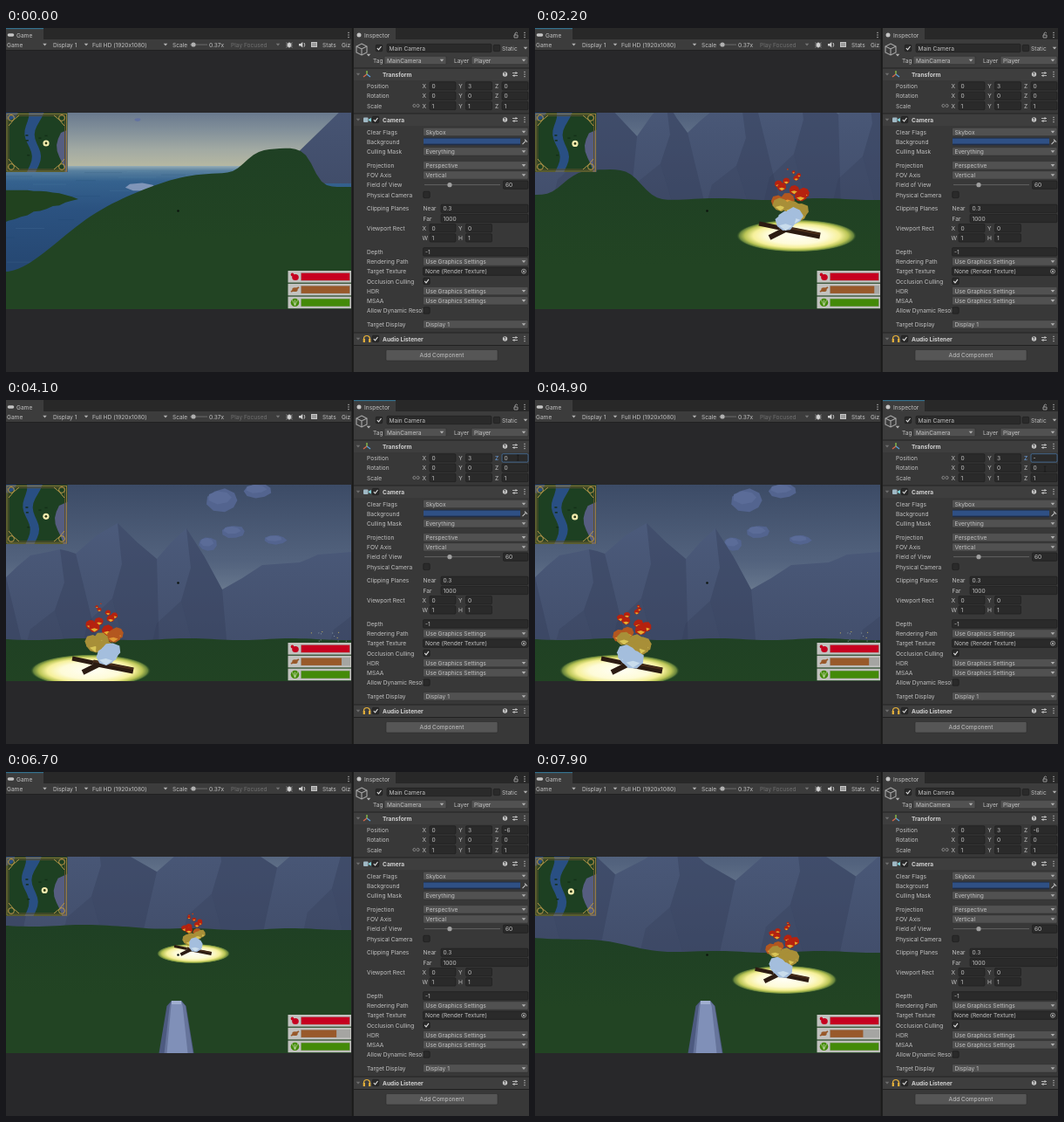
Write an HTML page with a canvas that moves like this. It is 600x394 px and loops after 8000 ms.

```html
<!DOCTYPE html>
<html lang="en">
<head>
<meta charset="utf-8">
<title>Camera inspector</title>
<style>
html, body { margin: 0; width: 100%; height: 100%; overflow: hidden; background: #28282a; }
canvas, svg { position: absolute; left: 0; top: 0; }
canvas { top: 97px; }
text { font: 6.6px Inter, Roboto, sans-serif; fill: #c2c2c2; }
.b { font-weight: 700; fill: #d2d2d2; }
.dim { fill: #707070; }
</style>
</head>
<body>
<canvas id="view" width="396" height="225"></canvas>
<svg id="ui" width="600" height="394" viewBox="0 0 600 394"></svg>
<script>
const ui = document.getElementById('ui');
const g = document.getElementById('view').getContext('2d');
const TAU = Math.PI * 2;

// ---------- editor panels ----------
function el(tag, attrs, text) {
  const e = document.createElementNS('http://www.w3.org/2000/svg', tag);
  for (const k in attrs) e.setAttribute(k, attrs[k]);
  if (text !== undefined) e.textContent = text;
  return ui.appendChild(e);
}
const box = (x, y, width, height, fill, more) => el('rect', { x, y, width, height, fill, ...more });
const dot = (cx, cy, r, fill = '#c4c4c4', more) => el('circle', { cx, cy, r, fill, ...more });
const label = (x, y, s, cls = '') => el('text', { x, y: y + 2.6, class: cls }, s);
const path = (d, stroke = '#c4c4c4', fill = 'none', w = 0.9) => el('path', { d, stroke, fill, 'stroke-width': w });
const arrow = (x, y, c = '#b0b0b0') => path(`M${x - 2.3} ${y - 1.2}h4.6l-2.3 2.8z`, 'none', c);
const edge = c => ({ rx: 1.3, stroke: c, 'stroke-width': 0.6 });
const field = (x, y, w, s) => [box(x, y - 4.7, w, 9.4, '#2a2a2a', edge('#1d1d1d')), label(x + 2.5, y, s)];
const drop = (x, y, w, s) => {
  box(x, y - 4.7, w, 9.4, '#515151', edge('#303030'));
  label(x + 3, y, s);
  arrow(x + w - 5, y);
};
const check = (x, y, on) => {
  box(x - 3.7, y - 3.7, 7.4, 7.4, '#2a2a2a', edge('#1a1a1a'));
  if (on) path(`M${x - 2.2} ${y}l1.7 1.9 3-3.9`, '#e0e0e0', 'none', 1.1);
};
const menu = (x, y) => [-2.6, 0, 2.6].forEach(d => box(x - 0.6, y + d - 0.6, 1.2, 1.2, '#c4c4c4'));
function header(y, name, on) {
  box(399, y - 7, 201, 14, '#3e3e3e');
  box(399, y - 7.4, 201, 0.8, '#1c1c1c');
  arrow(404, y, '#6e6e6e');
  if (on) check(424, y, true);
  label(432, y, name, 'b');
  dot(572.5, y, 2.7);
  el('text', { x: 571.1, y: y + 1.8, style: 'font-size:4.5px;font-weight:700;fill:#383838' }, '?');
  path(`M581 ${y - 1.5}h6M581 ${y + 1.5}h6M585 ${y - 3}v3M583 ${y}v3`);
  menu(595, y);
}

function gameChrome() {
  box(0, 0, 397, 13, '#282828');
  box(0, 0, 43, 13, '#3c3c3c');
  box(0, 13, 397, 12, '#3c3c3c');
  box(0, 25, 397, 0.8, '#202020');
  path('M3.5 6.2h4a1.8 1.8 0 0 1 0 3.6h-4a1.8 1.8 0 0 1 0-3.6z', 'none', '#c4c4c4');
  label(12, 8, 'Game');
  menu(393, 8);
  label(1, 19, 'Game'); arrow(44.5, 19);
  label(54, 19, 'Display 1'); arrow(92, 19);
  label(99, 19, 'Full HD (1920x1080)'); arrow(183, 19);
  label(191, 19, 'Scale');
  box(211, 18.6, 20, 0.9, '#707070');
  dot(215, 19, 2.6, '#b0b0b0');
  label(233, 19, '0.37x');
  label(258, 19, 'Play Focused', 'dim'); arrow(312, 19, '#747474');
  el('ellipse', { cx: 325, cy: 19.5, rx: 2, ry: 3, fill: '#d0d0d0' });
  path('M321.5 17l7 5M328.5 17l-7 5M321.5 19.5h7', '#d0d0d0', 'none', 0.7);
  path('M336 18v2.6h2l2.3 2v-6.6l-2.3 2z', 'none', '#d0d0d0');
  path('M342 17q1.6 2.3 0 4.6', '#d0d0d0');
  box(350, 16, 7, 6, '#c4c4c4');
  path('M351 20h5M351 18h5', '#3c3c3c', 'none', 0.6);
  label(363, 19, 'Stats');
  label(385, 19, 'Giz');
}

function inspectorHead() {
  box(396.5, 0, 203.5, 394, '#383838');
  box(396.5, 0, 2.3, 394, '#1a1a1a');
  box(399, 0, 201, 13, '#282828');
  box(399, 0, 48, 13, '#3c3c3c');
  dot(405, 8, 2.5);
  label(411, 8, 'Inspector');
  path('M583 8h4v3h-4zM584 8v-2q1.5-2 3 0', '#b0b0b0', 'none', 0.8);
  menu(595, 8);
  box(399, 13, 201, 33, '#3c3c3c');
  path('M408 18l6 3v7l-6 3-6-3v-7zM402 21l6 3 6-3M408 24v7', '#a8a8a8', 'none', 1.1);
  arrow(416, 31);
  check(428, 23, true); field(437, 23, 120, 'Main Camera');
  check(563, 23); label(569, 23, 'Static'); arrow(596, 23);
  label(421, 37, 'Tag'); drop(434, 37, 71, 'MainCamera');
  label(514, 37, 'Layer'); drop(534, 37, 65, 'Player');
}

let zBox, zText, zLabel;
function transformBlock() {
  header(53, 'Transform');
  path('M414 53v-4', '#8fc94a', 'none', 1.3);
  path('M414 53l-4 3', '#d86a4a', 'none', 1.3);
  path('M414 53l4 3', '#5aa0d8', 'none', 1.3);
  [['Position', 0, 3, 0], ['Rotation', 0, 0, 0], ['Scale', 1, 1, 1]].forEach(([name, ...v], row) => {
    const y = 66.4 + row * 11.3;
    label(414, y, name);
    v.forEach((s, i) => {
      const l = label(477.5 + i * 41.7, y, 'XYZ'[i]), f = field(486 + i * 41.5, y, 30, s);
      if (!row && i == 2) { zLabel = l; [zBox, zText] = f; }
    });
  });
  path('M469.5 87.4h-1a1.6 1.6 0 0 0 0 3.2h1M471.5 87.4h1a1.6 1.6 0 0 1 0 3.2h-1M469 89h3', '#a8a8a8', 'none', 0.7);
}

function cameraBlock() {
  header(105, 'Camera', true);
  box(410, 102.4, 5.5, 5.5, '#9fb8c4', { rx: 1 });
  path('M416 104.5l3-1.5v4.5l-3-1.5z', 'none', '#7fd0d8');
  const list = s => y => drop(478.5, y, 120.5, s);
  const tick = on => y => check(482.5, y, on);
  const named = (name, s) => y => { label(478.5, y, name); field(499, y, 100, s); };
  const pair = (a, b, v, w) => y => {
    label(477.5, y, a); field(486, y, 30, v);
    label(519, y, b); field(527.5, y, 30, w);
  };
  const swatch = y => {
    box(479, y - 4.5, 111, 8.6, '#1f2d47');
    box(479, y - 3.6, 111, 6, '#2f5085');
    path(`M592.5 ${y + 3}l3.5-3.5M595 ${y - 2.5}l3 3`, '#c0c0c0', 'none', 1.1);
  };
  const slider = y => {
    box(480, y - 0.6, 87, 1, '#626262');
    dot(509, y, 2.6, '#a0a0a0');
    field(570.5, y, 28.5, 60);
  };
  const object = y => {
    field(478.5, y, 120.5, 'None (Render Texture)');
    dot(594, y, 2.5, 'none', { stroke: '#c4c4c4', 'stroke-width': 0.7 });
    dot(594, y, 1);
  };
  const gfx = list('Use Graphics Settings');
  let y = 119;
  [['Clear Flags', list('Skybox')], ['Background', swatch], ['Culling Mask', list('Everything')], 0,
   ['Projection', list('Perspective')], ['FOV Axis', list('Vertical')], ['Field of View', slider], ['Physical Camera', tick(false)], 0,
   ['Clipping Planes', named('Near', '0.3')], ['', named('Far', '1000')], ['Viewport Rect', pair('X', 'Y', 0, 0)], ['', pair('W', 'H', 1, 1)], 0,
   ['Depth', y => field(478.5, y, 120.5, '-1')], ['Rendering Path', gfx], ['Target Texture', object], ['Occlusion Culling', tick(true)],
   ['HDR', gfx], ['MSAA', gfx], ['Allow Dynamic Resolu', tick(false)], 0,
   ['Target Display', list('Display 1')]].forEach(row => {
    if (!row) return y += 4.7;
    label(414, y, row[0]);
    row[1](y);
    y += 11.2;
  });
}

function audioBlock() {
  header(356, 'Audio Listener', true);
  path('M410.5 357v-1a3.5 3.5 0 0 1 7 0v1', '#e8b23a', 'none', 1.2);
  [409.7, 416.1].forEach(x => box(x, 356, 2.2, 4, '#e8b23a'));
  box(399, 363, 201, 0.8, '#1c1c1c');
  box(436, 368.5, 128, 12.5, '#565656', edge('#2c2c2c'));
  el('text', { x: 500, y: 377.2, 'text-anchor': 'middle' }, 'Add Component');
}

gameChrome();
inspectorHead();
transformBlock();
cameraBlock();
audioBlock();
const gameLine = box(0, 0, 43, 1.2), inspLine = box(399, 0, 48, 1.2);
const cursor = path('', '#8a8a8a', '#0c0c0c', 0.4);

// ---------- helpers ----------
const rnd = i => { const v = Math.sin(i * 12.9898 + 4.1) * 43758.5453; return v - Math.floor(v); };
const lerp = (a, b, f) => a + (b - a) * f;
const range = (n, fn) => Array.from({ length: n }, (_, i) => fn(i));
// in-between of a list of camera poses
function pose(list, q) {
  const i = Math.min(Math.floor(q), list.length - 2);
  return list[i].map((v, k) => lerp(v, list[i + 1][k], q - i));
}
function track(keys, t) {
  let i = 0;
  while (i < keys.length - 2 && t >= keys[i + 1][0]) i++;
  const [a, b] = [keys[i], keys[i + 1]];
  const f = Math.max(0, Math.min(1, (t - a[0]) / (b[0] - a[0])));
  return a.slice(1).map((v, k) => lerp(v, b[k + 1], f * f * (3 - 2 * f)));
}
function poly(p, fill) {
  g.beginPath();
  p.forEach(([x, y]) => g.lineTo(x, y));
  g.closePath();
  g.fillStyle = fill;
  g.fill();
}
function ramp(y0, y1, ...colors) {
  const r = g.createLinearGradient(0, y0, 0, y1);
  colors.forEach(([o, c]) => r.addColorStop(o, c));
  return r;
}
const rect = (x, y, w, h, c) => { g.fillStyle = c; g.fillRect(x, y, w, h); };
function disc(x, y, rx, ry, c) {
  g.beginPath(); g.ellipse(x, y, rx, ry, 0, 0, TAU);
  g.fillStyle = c; g.fill();
}
function line(x, y, x2, y2, w, c) {
  g.strokeStyle = c; g.lineWidth = w;
  g.beginPath(); g.moveTo(x, y); g.lineTo(x2, y2); g.stroke();
}
const lump = (x, y, rx, ry, n, seed = 0) => range(n, i => {
  const a = seed + i / n * TAU, k = 0.82 + 0.18 * rnd(i + seed);
  return [x + Math.cos(a) * rx * k, y + Math.sin(a) * ry * k];
});

// ---------- landscape ----------
const sky = h => rect(0, 97, 396, 225, ramp(h - 185, h,
  [0, '#3b4a65'], [0.5, '#53637e'], [0.64, '#63738a'], [0.78, '#82909a'], [0.9, '#a2aaa3'], [1, '#b6b8a2']));

function sea(h, pan) {
  rect(0, h, 396, 230, ramp(h, h + 110, [0, '#96adb6'], [0.05, '#58809f'], [0.16, '#35628e'], [0.45, '#2b5280'], [1, '#264873']));
  for (let i = 0; i < 60; i++)
    rect((i * 137 + pan + 4000) % 460 - 40, h + 6 + i * i * 0.045, 18 + i % 7 * 5, 1, i % 2 ? 'rgba(22,54,95,.13)' : 'rgba(111,154,187,.13)');
}

// ridge line through a few summits and saddles, with rough slopes
function ridge(keys, [dx, dy], base) {
  const p = keys.flatMap(([x, y], i) => {
    const [nx, ny] = keys[i + 1] || [x, y];
    return [[x + dx, y + dy], [lerp(x, nx, 0.5) + dx, lerp(y, ny, 0.4 + 0.2 * rnd(i)) + dy]];
  });
  const last = p.length - 1;
  poly([...p, [p[last][0], base], [p[0][0], base]], ramp(base - 150, base, [0, '#4b5a7a'], [1, '#414d6a']));
  for (let i = 2; i < last; i += 2) {
    const [x, y] = p[i];
    if (p[i - 1][1] < y || p[i + 1][1] < y) continue;
    const at = k => lerp(y, base, k);
    poly([[x, y], p[i + 1], p[Math.min(i + 2, last)], [x + 48, base], [x + 12, base], [x - 6, at(0.55)], [x + 5, at(0.3)]], 'rgba(50,60,88,.4)');
    poly([[x - 6, at(0.55)], [x - 34, at(0.72)], [x - 44, base], [x + 12, base]], 'rgba(50,60,86,.3)');
  }
}

// left level, right level, shore start, hill x, hill height, hill width
function ground([left, right, shore, hx, hh, hw]) {
  const top = x => {
    const d = Math.max(0, x - shore);
    return left + (right - left) / (1 + Math.exp((hx + 40 - x) * 10 / hw))
      + 117 * Math.exp(-((d / 115) ** 1.6)) - hh * Math.exp(-(((x - hx) / hw) ** 4)) + Math.sin(x / 19);
  };
  poly([[-10, 340], ...range(70, i => [i * 6 - 10, top(i * 6 - 10)]), [410, 340]],
    ramp(left - hh, left + 80, [0, '#1f4024'], [1, '#224423']));
}

// tapering headland: tip x, y, length, rise of the upper edge, fall of the lower edge
function headland([tx, ty, len, rise, fall]) {
  const n = 24, x = u => tx - len * 1.2 * (1 - u);
  const rough = i => i < n - 1 ? 3 * rnd(i) : 0;
  poly([...range(n, i => { const u = i / (n - 1); return [x(u), ty - rise * (1 - u ** 7) + rough(i) * 0.4]; }),
    ...range(n, i => { const u = 1 - i / (n - 1); return [x(u), ty + fall * 1.2 * (1 - u) - rough(n - 1 - i)]; })], '#21421f');
}

function flames(t) {
  const n = 19;
  const tones = [['#a4bedd', '#c9dcec'], ['#a88f38', '#d9c557'], ['#b3571f', '#e09a35'], ['#b5220f', '#e6ae2f']];
  range(n, i => [(t / 1000 + i / n) % 1, i]).sort((a, b) => b[0] - a[0]).forEach(([age, i]) => {
    const r = 12.5 * (1 - age) ** 0.8 + 0.8, y = -13 - age * 64;
    const x = Math.sin(i * 7.3 + 1) * (4 + 12 * Math.sin(age * 3));
    const [c, low] = tones[age < 0.16 ? 0 : age < 0.4 ? 1 : age < 0.48 ? 2 : 3];
    poly(lump(x, y, r, r * 0.9, 8, i), c);
    poly([[x - r * 0.6, y + r * 0.3], [x, y + r * 0.15], [x + r * 0.6, y + r * 0.35], [x, y + r * 0.75]], low);
  });
}

// pool x, y, size, flame offset
function fire([x, y, s, off], t) {
  g.save();
  g.translate(x, y);
  g.scale(s, s);
  g.save();
  g.scale(1, 0.27);
  const glow = g.createRadialGradient(0, 0, 0, 0, 0, 69);
  [[0, '#fffef4'], [0.5, '#fefbd8'], [0.72, '#f6f09a'], [0.86, '#b9c455'], [0.95, '#63813a'], [1, 'rgba(40,75,35,0)']]
    .forEach(a => glow.addColorStop(...a));
  disc(0, 0, 69, 69, glow);
  g.restore();
  g.translate(off, 0);
  line(-36, -14, -12, -9, 5, '#2c1b12');
  line(-2, -9, -24, 2, 6, '#2c1b12');
  line(-12, -9, 34, 0, 7, '#2c1b12');
  line(-12, -11, 34, -2, 2, '#4a2e1a');
  flames(t);
  g.restore();
}

// ---------- views; open poses run west bay, coast, camp, camp looking up ----------
const OPEN = {
  horizon: [[165], [158], [195], [278]],
  pan: [[807], [505], [175], [0]],
  land: [[274, 274, 30, 640, 24, 42], [162, 181, 0, 313, 24, 42], [191, 196, -420, 78, 28, 50], [272, 274, -600, -130, 28, 50]],
  spit: [[385, 224, 385, 46, 47], [83, 196, 140, 11, 46], [-250, 230, 140, 11, 46], [-430, 310, 140, 11, 46]],
  peaks: [[870, -113], [560, -120], [175, -83], [0, 0]],
  fire: [[870, 215, 1, -7], [630, 200, 1, -7], [300, 238, 1, -7], [97, 310, 1, 15]]
};
const FOLLOW = {
  land: [[270, 274, -600, 120, 0, 90], [176, 180, -600, 120, 0, 90], [190, 206, -600, 60, 0, 200]],
  peaks: [[-155, 85], [-57, -10], [0, 0]],
  fire: [[112, 303, 0.6, 5], [215, 208, 0.61, 0], [286, 238, 0.88, -2]]
};
const campPeaks = [[-235, 272], [-115, 150], [-58, 207], [-25, 165], [0, 203], [28, 178], [62, 171], [80, 176], [128, 141], [173, 182],
  [207, 147], [248, 217], [294, 189], [337, 186], [358, 177], [410, 173], [480, 235]];
const backPeaks = range(18, i => [i * 69 - 322, i % 2 ? 45 + 30 * rnd(i) : 116 + 12 * rnd(i)]);
const clouds = [[253, 115, 20, 14], [294, 104, 17, 9], [266, 151, 14, 8], [237, 165, 11, 9], [210, 184, 16, 9], [314, 160, 14, 6]];

function openView(q, t) {
  const at = k => pose(OPEN[k], q);
  const [h] = at('horizon'), [pan] = at('pan');
  sky(h);
  clouds.forEach(([x, y, rx, ry], i) => {
    const cx = x + pan - (t - 3200) * 0.006, cy = y + h - 278;
    poly(lump(cx, cy, rx, ry, 9, i), '#53648f');
    poly(lump(cx - rx * 0.1, cy - ry * 0.25, rx * 0.75, ry * 0.6, 7, i), '#5b6c98');
  });
  if (q < 2) {
    const near = Math.max(0, 1 - q);
    poly(lump(151 + 4 * near, h - 53 - 9 * near, 4 + 13 * near, 2 + 6 * near, 8), '#6373a0');
  }
  sea(h, pan);
  ridge(campPeaks, at('peaks'), h + 20);
  headland(at('spit'));
  poly(lump(pan - 350, h + 24, 19, 5, 7, 3), '#8095b8');
  if (q < 1) {
    rect(54 - 302 * q, 180, 20, 3, '#8fa2bc');
    rect(62 - 302 * q, 183, 6, 12, '#8fa2bc');
  }
  ground(at('land'));
  if (q > 2) for (let i = 0; i < 12; i++)
    rect(345 + 45 * rnd(i) + pan, h - 14 + 12 * rnd(i + 50), 1, 1, i % 3 ? '#8798a4' : '#c9b65c');
  if (q > 1.2) fire(at('fire'), t);
}

function followView(q, t) {
  const at = k => pose(FOLLOW[k], q), land = at('land');
  sky(land[0] + 8);
  ridge(backPeaks, at('peaks'), land[0] + 30);
  ground(land);
  fire(at('fire'), t);
  const robe = (l, r, c) => poly([[195.5 - l, 322], [195.5 - l * 0.55, 268], [190, 262], [201, 262], [195.5 + r * 0.55, 268], [195.5 + r, 322]], c);
  robe(20, 20, '#4d5a80');
  robe(14, 19, '#66749b');
  robe(11, 13, '#8090b8');
  rect(190, 262, 11, 4, '#a0aed0');
}

function minimap(t) {
  const k = t / 8000, dx = 1 - 4 * k, dy = 2 * k;
  g.save();
  g.beginPath(); g.rect(0, 97, 70.5, 68); g.clip();
  rect(0, 97, 71, 68, '#1d4022');
  const bank = side => range(16, i => [30 + dx + 4 * Math.sin(i * 0.6 + 1.2) + side * (5 + 5 * Math.exp(-i / 3)), 92 + dy + i * 5]);
  poly([...bank(-1), ...bank(1).reverse()], '#294f83');
  poly(lump(3 + dx, 97 + dy, 11, 9, 8), '#294f83');
  poly([[72, 116], ...range(8, i => [62 + dx - 5 * Math.sin(i * 0.7), 120 + dy + i * 7]), [72, 170]], '#565d80');
  for (let i = 0; i < 6; i++) rect(5 + 50 * rnd(i), 108 + 48 * rnd(i + 9), 3, 1.5, '#142f18');
  g.restore();
  g.lineWidth = 1;
  g.strokeStyle = '#96793a'; g.strokeRect(1, 98.5, 68.5, 65.5);
  g.strokeStyle = '#5c4f2a'; g.strokeRect(3, 100.5, 64.5, 61.5);
  g.strokeStyle = '#b7974a';
  for (const sx of [1, -1]) for (const sy of [1, -1]) {
    const x = 35 - sx * 34, y = 131 - sy * 33;
    g.beginPath();
    g.arc(x + sx * 5, y + sy * 5, 3.4, 0, TAU);
    g.moveTo(x + sx * 14, y + sy * 2);
    g.quadraticCurveTo(x + sx * 7, y + sy * 7, x + sx * 2, y + sy * 14);
    g.stroke();
  }
  const mx = 46 - 5 * k ** 6, my = 132 + 5 * k * k;
  disc(mx, my, 3.6, 3.6, '#f4ecae');
  disc(mx, my, 1.4, 1.4, '#2c3a18');
}

function hud(t) {
  [['#c60020', 55.5], ['#98592a', 55.5 - 2.25 * t / 1000], ['#438a08', 55.5]].forEach(([c, w], i) => {
    const y = 278 + i * 14.8;
    rect(323.5, y, 72.5, 13.6, '#c2c2bf');
    rect(338, y + 2.2, 57, 9.4, '#a5a5a2');
    rect(338.7, y + 2.7, w, 8.4, c);
  });
  disc(332, 285.5, 3.8, 3.5, '#c60020');
  disc(328.5, 282.5, 1.8, 2, '#c60020');
  line(327, 302, 336, 297, 2, '#98592a');
  disc(331.5, 299.7, 3.2, 2.4, '#98592a');
  disc(331.5, 314.4, 4.8, 4.6, '#438a08');
  [-3, 0, 3].forEach(d => line(331.5, 318, 331.5 + d, 311.5, 0.8, '#c2d8a8'));
}

// ---------- timeline ----------
const EDIT = 3400, MINUS = 4600, BACK = 5200, CLICK = 5600;
const lookKeys = [[0, 1], [1200, 0], [2200, 2], [3000, 3]];
const followKeys = [[CLICK, 0], [6500, 1], [6800, 1], [7900, 2]];
const mouseKeys = [[2500, 400, 210], [2700, 529, 150], [3200, 591, 55], [4300, 587, 65], [4800, 585, 77], [BACK, 585, 77], [5400, 420, 350], [CLICK, 250, 230]];

function inspector(t) {
  const focus = t >= EDIT && t < CLICK, hover = t >= 3000 && t < EDIT;
  gameLine.setAttribute('fill', focus ? '#3c3c3c' : '#33708c');
  inspLine.setAttribute('fill', focus ? '#33708c' : '#3c3c3c');
  zLabel.style.fill = focus ? '#6fa8ec' : '';
  zBox.setAttribute('stroke', focus ? '#4c86c6' : hover ? '#747474' : '#1d1d1d');
  zText.textContent = t < MINUS ? '0' : t < BACK ? '-' : '-6';
  const show = t >= 2500 && t < CLICK, beam = t >= EDIT && t <= BACK;
  cursor.style.display = show ? '' : 'none';
  const [x, y] = track(mouseKeys, t);
  cursor.setAttribute('d', beam ? `M${x - 1.5} ${y - 1}h3M${x} ${y - 1}v6M${x - 1.5} ${y + 5}h3` : `M${x} ${y}v6.5l1.6-1.4 1.2 2.4 1-.5-1.1-2.3h2z`);
  cursor.setAttribute('stroke', beam ? '#0c0c0c' : '#777');
}

function draw(t) {
  g.setTransform(1, 0, 0, 1, 0, -97);
  if (t < BACK) openView(track(lookKeys, t)[0], t);
  else followView(track(followKeys, t)[0], t);
  disc(197.5, 209.5, 1.3, 1.3, '#0c140e');
  minimap(t);
  hud(t);
  inspector(t);
}

let start;
function tick(now) {
  start ??= now;
  draw(Math.floor((now - start) / 100) * 100 % 8000);
  requestAnimationFrame(tick);
}
draw(0);
requestAnimationFrame(tick);
</script>
</body>
</html>
```
